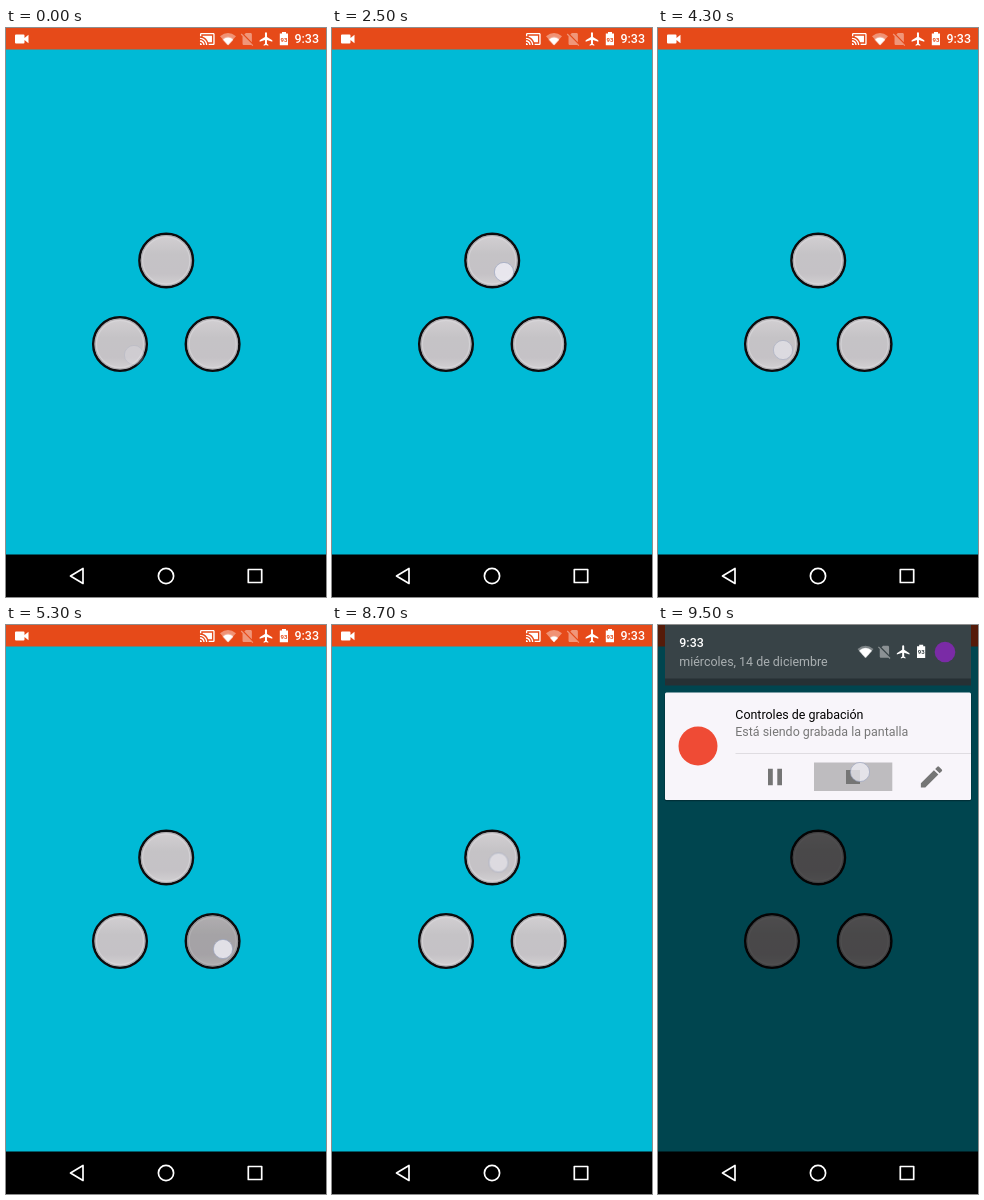
Recreate the animation shown at these times as an HTML page. Size 320 by 569 pixels, loop 9.6 s.

```html
<!DOCTYPE html>
<html lang="es">
<head>
<meta charset="utf-8">
<title>Tres botones</title>
<style>
html, body { margin: 0; width: 100%; height: 100%; overflow: hidden; background: #000; }
svg.stage { display: block; width: 100vw; height: 100vh; }
text { font: 12.44px Roboto, "Noto Sans", sans-serif; }
.medium { font-weight: 500; }
.pct { font-size: 6px; font-weight: 700; text-anchor: middle; }

.anim { animation: 9600ms step-end infinite; }
.dot { animation-name: dot; }
.top { animation-name: press-top; }
.left { animation-name: press-left; }
.right { animation-name: press-right; }
.level { animation-name: level; }
.shade-level { animation-name: shade-level; }
.shade { animation-name: shade; }
.panel { animation-name: panel; }
.small { animation-name: small; }
.large { animation-name: large; }
.tapped { animation-name: tapped; }

@keyframes dot {
  0% { transform: translate(128px, 327px); opacity: .28; }
  1.041% { transform: translate(219px, 340px); opacity: 0; }
  6.25% { transform: translate(219px, 340px); opacity: .95; }
  7.291% { transform: translate(219px, 340px); opacity: .7; }
  8.333% { transform: translate(219px, 340px); opacity: .3; }
  9.375% { transform: translate(217px, 326px); opacity: 0; }
  13.541% { transform: translate(217px, 326px); opacity: .95; }
  14.583% { transform: translate(217px, 326px); opacity: .35; }
  15.625% { transform: translate(172px, 244px); opacity: 0; }
  21.875% { transform: translate(172px, 244px); opacity: .95; }
  31.25% { transform: translate(172px, 244px); opacity: .4; }
  32.291% { transform: translate(125px, 322px); opacity: 0; }
  36.458% { transform: translate(125px, 322px); opacity: .95; }
  44.791% { transform: translate(125px, 322px); opacity: .65; }
  45.833% { transform: translate(125px, 322px); opacity: .28; }
  46.875% { transform: translate(216px, 325px); opacity: .95; }
  51.041% { transform: translate(216px, 325px); opacity: .4; }
  52.083% { transform: translate(217px, 324px); opacity: 0; }
  55.208% { transform: translate(217px, 324px); opacity: .95; }
  60.416% { transform: translate(217px, 324px); opacity: .4; }
  61.458% { transform: translate(168px, 237.5px); opacity: 0; }
  66.666% { transform: translate(168px, 237.5px); opacity: .95; }
  90.625% { transform: translate(166.5px, 237.5px); opacity: .65; }
  91.666% { transform: translate(202px, 147px); opacity: 0; }
  97.916%, 100% { transform: translate(202px, 147px); opacity: .9; }
}
@keyframes press-top {
  0%, 26.041%, 100% { opacity: 0; }
  21.875% { opacity: 1; }
}
@keyframes press-left {
  0%, 44.791%, 100% { opacity: 0; }
  36.458% { opacity: 1; }
}
@keyframes press-right {
  0%, 7.291%, 14.583%, 51.041%, 60.416%, 100% { opacity: 0; }
  6.25%, 13.541%, 46.875%, 55.208% { opacity: 1; }
}
@keyframes level {
  0% { transform: scale(.66); }
  66.666%, 100% { transform: scale(.5); }
}
@keyframes shade-level {
  0% { transform: scale(.68); }
  97.916%, 100% { transform: scale(.82); }
}
@keyframes shade {
  0% { opacity: 0; }
  91.666%, 100% { opacity: 1; }
}
@keyframes panel {
  0% { transform: translateY(3px); }
  92.708% { transform: translateY(1px); }
  93.75%, 100% { transform: translateY(0); }
}
@keyframes small {
  0% { opacity: 1; }
  92.708% { opacity: .4; }
  93.75%, 100% { opacity: 0; }
}
@keyframes large {
  0% { opacity: 0; }
  92.708% { opacity: .6; }
  93.75%, 100% { opacity: 1; }
}
@keyframes tapped {
  0% { opacity: 0; }
  97.916% { opacity: .6; }
  98.958%, 100% { opacity: 1; }
}
</style>
</head>
<body>
<svg class="stage" viewBox="0 0 320 569" preserveAspectRatio="none">
  <defs>
    <linearGradient id="face" x2="0" y2="1">
      <stop offset="0" stop-color="#d3d0d3"/>
      <stop offset=".38" stop-color="#c5c3c6"/>
      <stop offset=".75" stop-color="#c5c2c6"/>
      <stop offset="1" stop-color="#d4d2d4"/>
    </linearGradient>
    <g id="button">
      <circle r="26.8" fill="url(#face)" stroke="#0c0c0e" stroke-width="2.5"/>
      <circle r="24.9" fill="none" stroke="#a5a3a7" stroke-width="1.2" opacity=".7"/>
      <circle r="23.6" fill="none" stroke="#dddbde" stroke-width="1.2" opacity=".6"/>
    </g>
    <circle id="pressed" r="25.6" fill="#000" opacity=".16"/>
    <path id="fan" d="M0 0L-8-9Q0-15.4 8-9Z"/>
    <g id="signals" fill="#fff">
      <path opacity=".42" transform="translate(233.2 3) scale(.667)" d="M18.99 5c0-1.1-.89-2-1.99-2h-7L7.66 5.34 19 16.68zM3.65 3.88L2.38 5.15 5 7.77V19c0 1.1.9 2 2 2h10c.35 0 .67-.1.96-.26l1.88 1.88 1.27-1.27z"/>
      <path transform="translate(252.3 3) scale(.667)" d="M21 16v-2l-8-5V3.5a1.5 1.5 0 0 0-3 0V9l-8 5v2l8-2.5V19l-2 1.5V22l3.5-1 3.5 1v-1.5L13 19v-5.5z"/>
      <path d="M276 4h4v1.5h2V17.3h-8.2V5.500h2.200z"/>
      <text class="pct" x="278" y="13.600" fill="currentColor">93</text>
    </g>
    <path id="pause" d="M-7-8.300h4.800V8.300H-7zM2.300-8.300H7V8.300H2.300z"/>
    <path id="stop" d="M-7-7H7V7H-7z"/>
    <path id="pen" transform="scale(1.18) translate(-12 -12)" d="M3 17.250V21h3.750L17.810 9.940l-3.750-3.750zM20.710 7.040a1 1 0 0 0 0-1.410l-2.340-2.340a1 1 0 0 0-1.410 0l-1.830 1.830 3.750 3.750z"/>
  </defs>

  <rect width="320" height="569" fill="#00bad6"/>

  <!-- status bar -->
  <rect width="320" height="21.500" fill="#e64a19"/>
  <path fill="#fff" d="M10 6.500h7.500q1 0 1 1V10l4-3.300v8.600l-4-3.300v2.500q0 1-1 1H10q-1 0-1-1v-7q0-1 1-1z"/>
  <path fill="#fff" transform="translate(193.300 3) scale(.667)" d="M1 18v3h3c0-1.660-1.340-3-3-3zm0-4v2c2.760 0 5 2.240 5 5h2c0-3.870-3.130-7-7-7zm18-7H5v1.630c3.960 1.280 7.090 4.410 8.370 8.370H19zM1 10v2c4.970 0 9 4.030 9 9h2C12 14.920 7.070 10 1 10zm20-7H3c-1.100 0-2 .9-2 2v3h2V5h18v14h-7v2h7c1.100 0 2-.9 2-2V5c0-1.100-.9-2-2-2z"/>
  <g transform="translate(222 17.300)" fill="#fff">
    <use href="#fan" opacity=".4"/>
    <g class="anim level"><use href="#fan"/></g>
  </g>
  <use href="#signals" color="#e64a19"/>
  <text class="medium" x="288.500" y="15.400" fill="#fff">9:33</text>

  <!-- buttons -->
  <g transform="translate(160.200 232.500)">
    <use href="#button"/>
    <g class="anim top"><use href="#pressed"/></g>
  </g>
  <g transform="translate(114 316)">
    <use href="#button"/>
    <g class="anim left"><use href="#pressed"/></g>
  </g>
  <g transform="translate(206.600 316)">
    <use href="#button"/>
    <g class="anim right"><use href="#pressed"/></g>
  </g>

  <!-- notification shade -->
  <g class="anim shade">
    <rect width="320" height="527" fill="#000" opacity=".63"/>
    <g class="anim panel">
      <rect x="7" y="48" width="306" height="12.500" fill="#263034"/>
      <rect x="6.500" y="68" width="307" height="108.300" rx="2" fill="#000" opacity=".3"/>
      <rect x="7" y="67.500" width="306" height="107.500" rx="1.500" fill="#f8f5fa"/>
      <g class="anim small">
        <circle cx="25" cy="96" r="13.300" fill="#ef4b35"/>
        <text x="38" y="94">Controles de</text>
        <text x="38" y="108">grabación</text>
        <g fill="#757575">
          <use href="#pause" x="188" y="96"/>
          <use href="#stop" x="238" y="96"/>
          <use href="#pen" transform="translate(288 96)"/>
        </g>
      </g>
      <g class="anim large">
        <circle cx="40" cy="121" r="19.500" fill="#ef4b35"/>
        <text x="77.300" y="94.300">Controles de grabación</text>
        <text x="77.300" y="111.300" fill="#777">Está siendo grabada la pantalla</text>
        <rect x="77.500" y="128" width="235.500" height="1" fill="#dfdce1"/>
        <rect class="anim tapped" x="156" y="137.500" width="78.300" height="28.500" fill="#bebcbf"/>
        <g fill="#757575">
          <use href="#pause" x="117" y="152"/>
          <use href="#stop" x="195" y="152"/>
          <use href="#pen" transform="translate(273.500 152)"/>
        </g>
      </g>
    </g>
    <path d="M7 0H313V53.500H7z" fill="#384347"/>
    <text class="medium" x="21.300" y="22.300" fill="#fff">9:33</text>
    <text x="21.300" y="41.300" fill="#a9afb1">miércoles, 14 de diciembre</text>
    <g transform="translate(207.500 33)" fill="#fff">
      <use href="#fan" opacity=".35"/>
      <g class="anim shade-level"><use href="#fan"/></g>
    </g>
    <use href="#signals" x="-14.800" y="15.800" color="#384347"/>
    <circle cx="287" cy="27" r="10.300" fill="#7a2ba6"/>
  </g>

  <!-- navigation bar -->
  <rect y="526.500" width="320" height="42.500" fill="#000"/>
  <g fill="none" stroke="#fff" stroke-width="1.700" stroke-linejoin="round">
    <path d="M64.500 548L77 540.500V555.500Z"/>
    <circle cx="160" cy="548" r="7.600"/>
    <rect x="242.300" y="541.500" width="13.400" height="13"/>
  </g>

  <g class="anim dot">
    <circle r="9.600" fill="#f0eff6" fill-opacity=".85" stroke="#9ca6c2" stroke-opacity=".8" stroke-width=".9"/>
  </g>
</svg>
</body>
</html>
```
